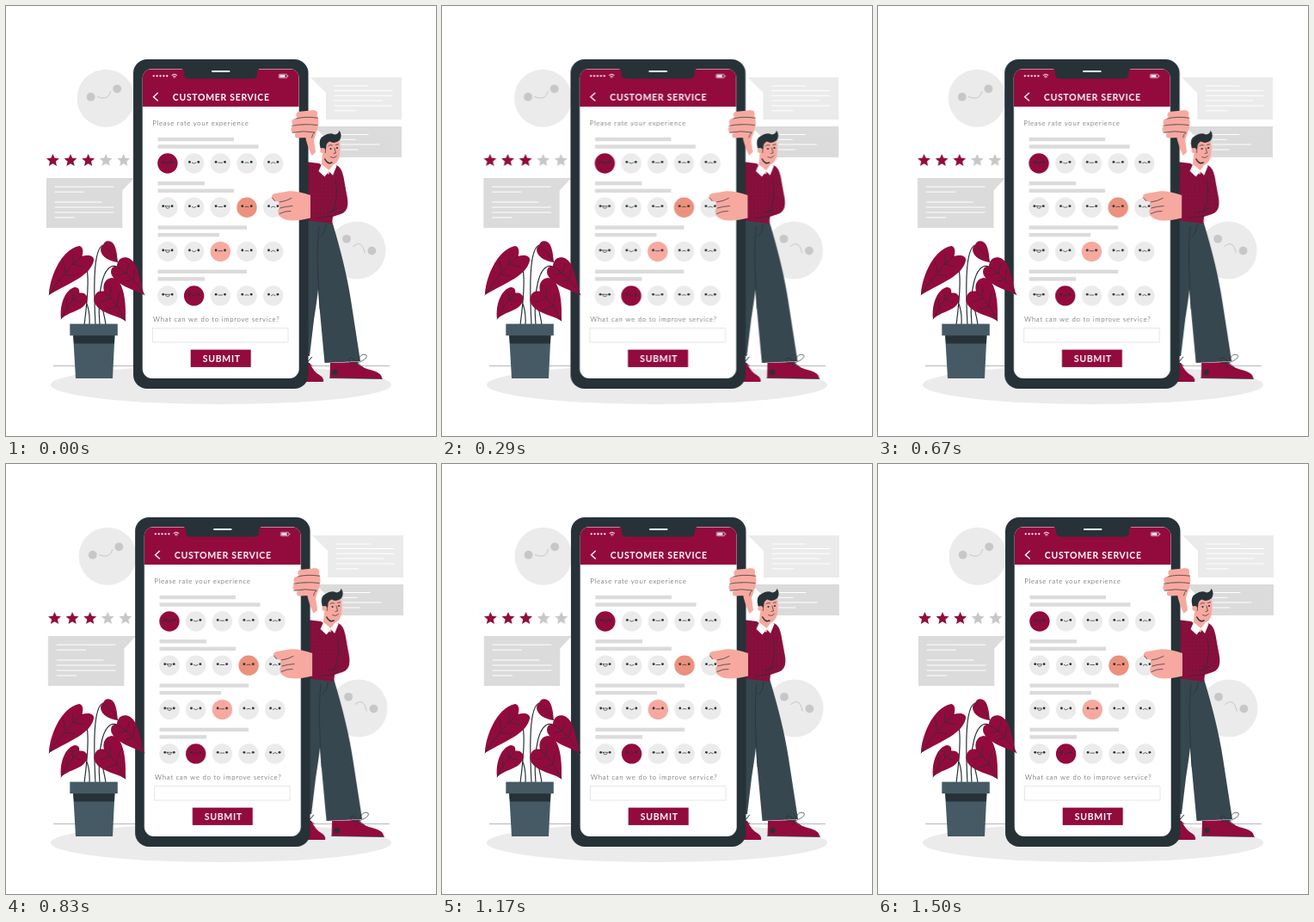
These frames come from a looping animation (500x500 px, 1540 ms). An HTML page:

```html
<!DOCTYPE html>
<html lang="en">
<head>
<meta charset="utf-8">
<title>Customer service survey</title>
<style>
  html, body { margin: 0; width: 100%; height: 100%; overflow: hidden; background: #fff; }
  svg { display: block; width: 100%; height: 100%; }
  text { font-family: Lato, "Open Sans", sans-serif; }
  .red { fill: #920b3c; }
  .ink { fill: #263238; }
  .skin { fill: #f7a9a0; }
  .pale { fill: #ebebeb; }
  .grey { fill: #dbdbdb; }
  .mid { fill: #c7c7c7; }
  .slate { fill: #37474f; }
  .line { fill: none; stroke: #263238; stroke-width: .7; stroke-linecap: round; stroke-linejoin: round; }
  .white { fill: none; stroke: #fff; stroke-width: 1; stroke-linecap: round; }
  .finger { fill: none; stroke: #f7a9a0; stroke-linecap: round; }
  .title { fill: #fff; font-size: 10.5px; font-weight: 700; letter-spacing: .68px; }
  .label { fill: #263238; font-size: 7.8px; font-weight: 300; letter-spacing: .74px; }
</style>
</head>
<body>
<svg viewBox="0 0 500 500">
  <defs>
    <pattern id="check" width="4.4" height="4.8" patternUnits="userSpaceOnUse">
      <path d="M0 .5H4.4M.5 0V4.8" stroke="#263238" stroke-width=".6" opacity=".45"/>
    </pattern>
    <clipPath id="screen"><rect x="158.7" y="73" width="182" height="360" rx="11"/></clipPath>
  </defs>

  <ellipse class="pale" cx="250" cy="440.5" rx="198" ry="22.5"/>
  <path d="M55 418.5H446" stroke="#263238" stroke-width=".35"/>

  <g id="shake">
    <!-- floating faces -->
    <circle class="pale" cx="116" cy="107.3" r="33.5"/>
    <circle class="mid" cx="98.6" cy="105.7" r="4.9"/>
    <circle class="mid" cx="129.2" cy="96.3" r="4.9"/>
    <path d="M106 105.500Q119 111 121.800 99" fill="none" stroke="#c7c7c7"/>
    <circle class="pale" cx="408" cy="284" r="33.5"/>
    <circle class="mid" cx="396" cy="270.8" r="4.9"/>
    <circle class="mid" cx="425.4" cy="284.6" r="4.9"/>
    <path d="M403.5 279.5Q414 270.5 417.3 287.5" fill="none" stroke="#c7c7c7"/>

    <!-- speech bubbles -->
    <path class="pale" d="M354 83H460V132H372V101Z"/>
    <path class="grey" d="M358 140H460V176H374V156Z"/>
    <path class="grey" d="M46.800 200H149L135.300 214.500V258H46.800Z"/>
    <g id="lines"></g>
    <g id="stars"></g>

    <!-- man -->
    <path class="slate" d="M346 248H372C366 300 364 330 358 365L353 407H346Z"/>
    <path class="red" d="M344 413L353 415Q358 426 365 429.5Q370 432.5 369 437H344Z"/>
    <path class="line" d="M350 415Q358 405 355 409T349 414L356 418"/>
    <path class="slate" d="M361 252L379 250C389 283 397 315 401 342L412 413L370.500 415L364 345C363 320 359 290 361 252Z"/>
    <path class="line" d="M364 256C360 290 364 330 365 352M372 254Q371 264 366 268"/>
    <path class="red" d="M377 415L407 414Q413 421 427 424Q437 427 437.5 433.5L376.5 432.5Z"/>
    <path class="line" d="M376.5 432.5L437.5 433.5"/>
    <circle class="ink" cx="382.5" cy="426" r="3.2"/>
    <path class="line" d="M398 417Q402 412 409 415C409 409 414 403 419 406C421 410 413 413 409 415Q400 405 398 412Q402 417 409 415L416 421M405 420L410 417"/>
    <g id="sweater"></g>
    <path class="line" d="M383 203Q388 222 379 240M380 244L362 247M386 234Q381 239 373 240"/>
    <path class="skin" d="M368 172L366.5 188L375 196L382 184Z"/>
    <path d="M367 184L363.5 192L370.5 198.5L375.5 192L380 197L384.5 186L381.5 183L375.5 191Z" fill="#fff"/>
    <path class="skin" d="M368 158L387 154Q389 163 388.3 172Q387 184 378.5 184.5Q370.5 184 368.5 174Z"/>
    <path class="ink" d="M365.5 165Q362.5 154 369.5 151Q376 146.5 382 149.5Q387 149 387.5 144.8Q391.5 150 388 156Q382 161 376.500 157.500Q373 159 372.500 162L371.500 171L368 168Z"/>
    <circle class="skin" cx="368.300" cy="168" r="3"/>
    <path class="line" d="M370.8 178Q374 184.500 379 182" style="stroke-width:1.500"/>
    <path class="line" d="M377.5 175.5Q382 178 384.5 174M382 165L383.5 171L381 171.5M375 162.500Q377 160.500 379.500 162M383.500 161.500L386.500 160.800"/>
    <circle class="ink" cx="377.5" cy="166" r="1.1"/>
    <circle class="ink" cx="385" cy="165" r="1.1"/>

    <!-- phone -->
    <rect class="ink" x="148" y="62" width="203.5" height="383" rx="16"/>
    <rect x="158.7" y="73" width="182" height="360" rx="11" fill="#fff"/>
    <rect class="red" x="158.7" y="73.500" width="182" height="43.500" clip-path="url(#screen)"/>
    <path class="ink" d="M203 72.5Q207 73.5 207 77V79Q207 84.5 212.5 84.5H286.5Q292 84.500 292 79V77Q292 73.500 296 72.500Z"/>
    <path class="white" d="M240 76H259.5" style="stroke-width:2"/>
    <g id="dots" fill="#fff"></g>
    <path class="white" d="M193 80.3Q195.8 78 198.6 80.3M194.3 82Q195.8 80.8 197.3 82M195.7 83.3H195.900"/>
    <rect x="317.300" y="79.300" width="9.400" height="4.400" rx="1" fill="none" stroke="#fff" stroke-width=".6"/>
    <path d="M318.200 80.200H324.500V82.800H318.200ZM327.400 80.700H328.200V82.300H327.400Z" fill="#fff"/>
    <path class="white" d="M176.3 101.3L171.5 105.7L176.3 110.1" style="stroke-width:1.4"/>
    <text class="title" x="193.8" y="109.5">CUSTOMER SERVICE</text>
    <text class="label" x="170.3" y="139">Please rate your experience</text>
    <g id="survey"></g>
    <text class="label" x="171" y="367">What can we do to improve service?</text>
    <rect x="170.3" y="374.7" width="157.7" height="16.3" fill="#fff" stroke="#dbdbdb" stroke-width=".7"/>
    <rect class="red" x="214.700" y="399.600" width="70" height="20.300"/>
    <text class="title" x="228.8" y="413.7">SUBMIT</text>

    <!-- hands -->
    <path class="skin" d="M347 123L357 121.3Q366 129 362.500 142L358 156L360 170L355.500 174Q350 162 348 152Z"/>
    <path class="finger" d="M341.500 126.800L358 125.300M336.500 135.200L359 133.800M335.500 143.300L358 142.500" stroke-width="8.200"/>
    <path class="finger" d="M339 150.300L354 149.500" stroke-width="6.300"/>
    <path class="line" d="M337 131Q348 128 362.5 130.2M332.5 139.300Q346 136.500 362 138.500M333 147.200Q346 144.500 359 147Q356 149 355.500 153"/>
    <path class="skin" d="M309 222.5Q308.5 218.5 313 218L329 215.3Q340 215 354 220V246.500Q336 251 325 248.500Q316.500 245.500 316.500 240Q315.500 236 318.500 234.500Q315.500 231 318 228L311.500 226.500Z"/>
    <path class="line" d="M318 228Q326 227 332 223.5M318.5 235Q325 233 333 232.5M318 241.5Q325 238 331 238.5M309.5 223L312.5 226.5"/>
  </g>

  <!-- plant -->
  <path class="line" d="M88 291C99 300 95 340 91 371M113 278C101 282 102 330 104 371M129 303C112 297 106 335 109 371M114 332C107 342 115 358 116 371M85 334C94 338 98 356 97 371" style="stroke-width:1.2"/>
  <g id="leaves"></g>
  <path d="M78 381H126.5L124 433H81Z" fill="#455a64"/>
  <path class="ink" d="M78 382H126.5L126 392.5H79Z"/>
  <rect x="74.3" y="369.6" width="55.5" height="13.6" fill="#455a64"/>
</svg>
<script>
const put = (id, markup) => { document.getElementById(id).innerHTML = markup; };
const RED = '#920b3c', PALE = '#ebebeb';

// text lines inside the bubbles: x, y, end
put('lines', [
  [382, 93, 421], [382, 98.5, 449], [382, 104.3, 449], [382, 110, 437], [382, 116, 449], [382, 121.8, 407],
  [390, 149.5, 421], [390, 155.3, 406], [390, 161, 434], [390, 167, 409],
  [57, 210.2, 125], [57, 216.2, 90.5], [57, 228, 111], [57, 234, 125], [57, 240, 125], [57, 246, 79.5]
].map(([x, y, end]) => `<path class="white" d="M${x} ${y}H${end}"/>`).join(''));

const star = (cx, cy) => Array.from({ length: 10 }, (_, i) => {
  const r = i % 2 ? 3.6 : 7.8, a = (i / 5 - .5) * Math.PI;
  return `${(cx + r * Math.cos(a)).toFixed(2)},${(cy + r * Math.sin(a)).toFixed(2)}`;
}).join(' ');
put('stars', [0, 1, 2, 3, 4].map(i =>
  `<polygon class="${i < 3 ? 'red' : 'mid'}" points="${star(54.4 + i * 20.6, 179.7)}"/>`).join(''));

put('dots', [0, 1, 2, 3, 4].map(i => `<circle cx="${171.7 + i * 3.9}" cy="81.3" r="1.15"/>`).join(''));

const torso = 'M347 181L364 183L367 185L371 197L384 185Q390 187 392.5 199L397 224Q399 239 389 242L380 245L379 253L347 249Z';
put('sweater', `<path class="red" d="${torso}"/><path d="${torso}" fill="url(#check)"/>`);

// survey rows: top, ends of the two bars, picked face, its colour
const mouths = [
  'M-2.6 -1.6H2.6Q2.2 1 0 1T-2.6 -1.6Z',
  'M-2.3 -.8Q0 1.4 2.3 -.8',
  'M-2.3 -.8H2.3',
  'M-2 -.7Q0 -1.8 2 -.7',
  'M-2.4 -.2Q0 -2.8 2.4 -.2'
];
const face = (x, y, i, fill) => `<g transform="translate(${x} ${y})">
  <circle r="11.7" fill="${fill}"/>
  <circle class="ink" cx="-5.2" cy="-1.6" r="1.4"/><circle class="ink" cx="5.2" cy="-1.6" r="1.4"/>
  <path class="line" d="${mouths[i]}"/></g>`;
const bar = (y, end) => `<rect class="grey" x="176.5" y="${y}" width="${end - 176.5}" height="4.4"/>`;
put('survey', [
  [152.8, 265, 293.5, 0, RED],
  [204.1, 231, 265, 3, '#ec917e'],
  [255.4, 280, 248, 2, '#f7a9a0'],
  [306.7, 280, 231, 1, RED]
].map(([y, end1, end2, pick, tint]) => bar(y, end1) + bar(y + 8.5, end2) +
  mouths.map((_, i) => face(187.9 + i * 30.7, y + 30.2, i, i === pick ? tint : PALE)).join('')).join(''));

// leaves: outline, veins
put('leaves', [
  ['M50 336C50 320 62 284 85 279C90 280 90 286 88.5 291C95 289 103 290 102 296C98 314 75 321 50 336Z',
   'M88 291Q70 306 50 336M78 299L78 289M69 309L67 297M77 300L90 303M67 312L80 314'],
  ['M130 298C121 297 111 292 110 284C110 281 111 279 113 278C114 274 118 272 122 274C128 277 129 288 130 298Z',
   'M113 278Q123 285 130 298'],
  ['M161 336C150 330 128 325 122.5 312C121 306 124 302 129 303C129 296 134 291 141 292.5C155 297 155 320 161 336Z',
   'M129 303Q147 313 161 336M140 310L143 300M148 317L150 306M140 310L131 313M148 318L139 320'],
  ['M139 366.5C130 359 106 358 102.5 343C102 335 107 330 114 332C112 324 115 317 123 316C136 317 140 340 139 366.5Z',
   'M114 332Q128 344 139 366M121 339L122 327M129 348L132 335M121 340L110 344M129 349L118 353'],
  ['M64 364C62 345 70 329 80 327C85 327 86 331 85 334C91 332 96 337 94 343C90 355 75 354 64 364Z',
   'M85 334Q73 346 64 364M78 341L77 333M78 341L87 344M71 350L70 341']
].map(([shape, veins]) => `<path class="red" d="${shape}"/><path class="line" d="${veins}"/>`).join(''));

// shake: swings 150 ms apart, shown at 24 pictures a second
const LOOP = 1540, COUNT = 37, SWING = 150, LEAD = 27, REST = -.2;
const swings = [0, -1, 2, -4, 4, -4, 4, -4, 2, -1, 0];
const shiftAt = ms => {
  const u = ((ms + LEAD) / SWING) % 10, i = Math.floor(u);
  return swings[i] + (swings[i + 1] - swings[i]) * (u - i) - REST;
};
const steps = Array.from({ length: COUNT }, (_, k) => {
  const ms = k * 1000 / 24;
  return {
    offset: Math.round(ms / 10) * 10 / LOOP,
    transform: `translate(${shiftAt(ms).toFixed(3)}px, 0px)`,
    easing: 'step-end'
  };
});
steps.push({ offset: 1, transform: steps[COUNT - 1].transform });
document.getElementById('shake').animate(steps, { duration: LOOP, iterations: Infinity });
</script>
</body>
</html>
```
